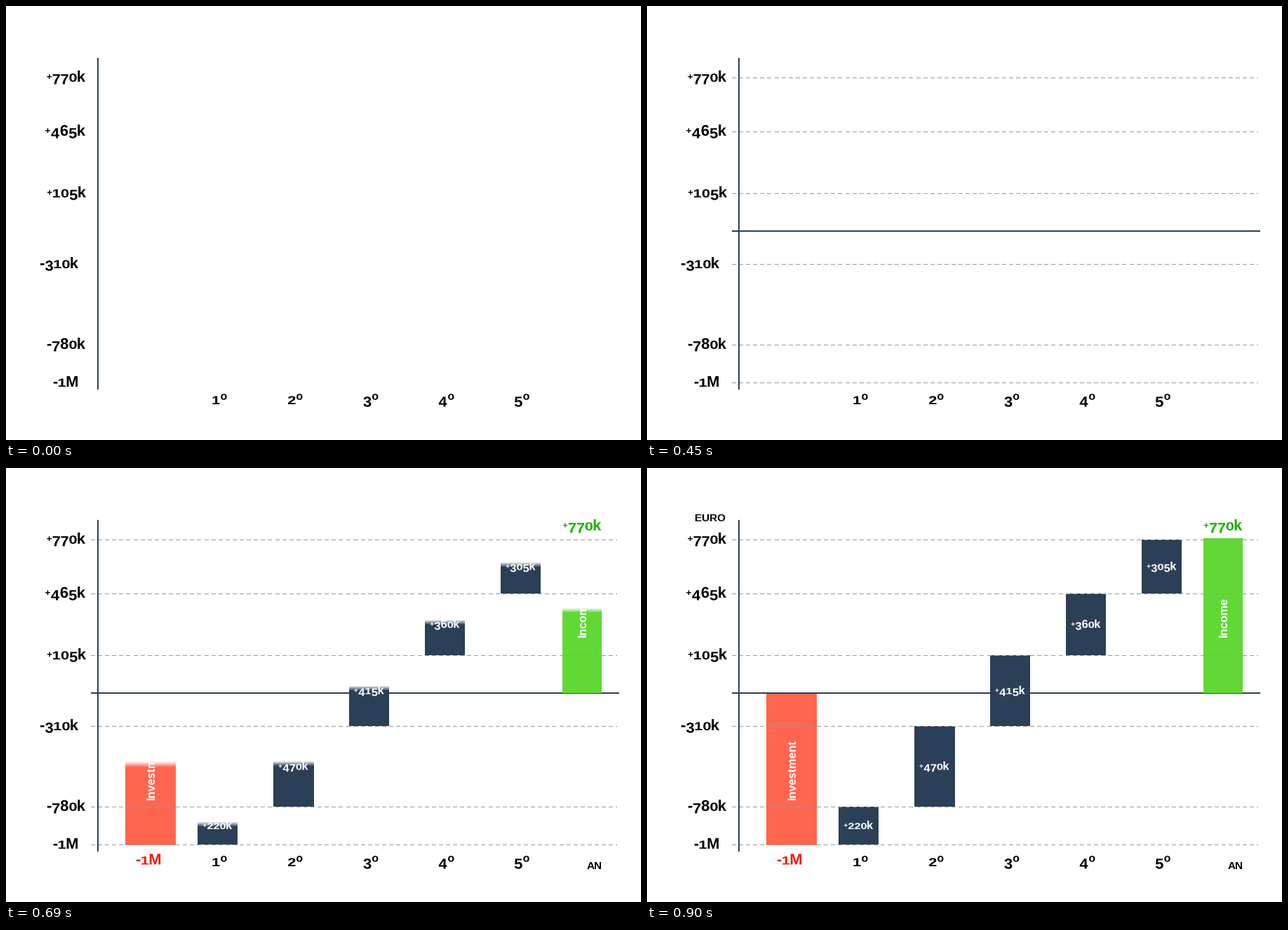
These frames come from a looping animation (905x619 px, 0.93 s). A matplotlib script:

```python
import matplotlib.pyplot as plt
import numpy as np
from itertools import accumulate
from matplotlib.animation import FuncAnimation
from matplotlib.colors import to_rgb
from matplotlib.patches import PathPatch, Rectangle
from matplotlib.path import Path
from matplotlib.textpath import TextPath

W, H, DPI = 905, 619, 100
FRAMES, STEP = 31, 30
PX = 72 / DPI

NAVY, GREY = "#2b4057", "#999999"
RED, GREEN = "#ff6650", "#62d836"
RED_TEXT, GREEN_TEXT = "#f01c0c", "#1db000"
FONT = {"family": "Liberation Sans", "weight": "bold"}

LEFT, RIGHT = 121, 873
ZERO = 321
WIPE_STEPS = 15
LINE_FADE = 100

# Yearly cash flow in thousands and the height of each running total.
FLOWS = [220, 470, 415, 360, 305]
TOTALS = list(accumulate(FLOWS, initial=-1000))
LEVELS = [537, 483, 368, 267, 179, 102]
LABEL_RIGHT = [102, 113, 103, 114, 113, 113]

fig = plt.figure(figsize=(W / DPI, H / DPI), dpi=DPI, facecolor="white")
ax = fig.add_axes([0, 0, 1, 1])
ax.axis("off")


def old_style(ch):
    """Width scale, height scale and rise (em) for old-style figures."""
    if ch in "012":
        return 1, .76, 0
    if ch in "34579":
        return 1, .94, -.16
    if ch == "+":
        return .6, .6, .13
    if ch == "º":
        return .72, .72, .29
    return 1, 1, 0


def figure_text(x, base, s, size=22, color="black", align=.5):
    """Draw a label with old-style figures on one baseline."""
    verts, codes, pen = [], [], 0
    for ch in s:
        sx, sy, rise = old_style(ch)
        glyph = TextPath((0, 0), "o" if ch == "º" else ch, size=size, prop=FONT)
        box = glyph.get_extents()
        verts.append(np.column_stack([
            (glyph.vertices[:, 0] - box.x0) * sx + pen,
            base - glyph.vertices[:, 1] * sy - rise * size]))
        codes.append(glyph.codes)
        pen += box.width * sx + .07 * size
    verts = np.concatenate(verts)
    verts[:, 0] += x - align * (pen - .07 * size)
    return ax.add_patch(PathPatch(Path(verts, np.concatenate(codes)),
                                  fc=color, lw=0, zorder=5))


def word(x, base, s, size, color="black", rotation=0):
    return ax.text(x, base, s, fontsize=size * PX, color=color, **FONT,
                   rotation=rotation, rotation_mode="anchor",
                   ha="left", va="baseline", zorder=5)


def amount(v):
    return f"{v // 1000}M" if v % 1000 == 0 else f"{v:+d}k"


def strip(x0, x1, top, bottom, shape, color, zorder):
    """A flat coloured image whose alpha can be wiped."""
    rgba = np.zeros(shape + (4,))
    rgba[..., :3] = to_rgb(color)
    im = ax.imshow(rgba, extent=(x0, x1, bottom, top), aspect="auto",
                   interpolation="nearest", zorder=zorder)
    return im, rgba


def wipe(dist, length, fade, progress):
    """Alpha at each distance along a soft-edged wipe."""
    edge = progress * (length + fade)
    return np.clip((edge - dist) / fade, 0, 1)


class Rule:
    def __init__(self, top, thick, color, dashed, zorder):
        self.n = RIGHT - LEFT
        self.dist = np.arange(self.n) + .5
        self.mask = np.ones(self.n)
        if dashed:
            self.mask = ((self.dist % 10.1 < 6) & (self.dist < 749)).astype(float)
        self.im, self.rgba = strip(LEFT, RIGHT, top, top + thick,
                                   (1, self.n), color, zorder)

    def draw(self, i):
        p = min(i / WIPE_STEPS, 1)
        self.rgba[0, :, 3] = self.mask * wipe(self.dist, self.n, LINE_FADE, p)
        self.im.set_data(self.rgba)


class Bar:
    def __init__(self, x0, width, top, bottom, color, start):
        self.h, self.start = bottom - top, start
        self.fade = width / 8
        self.dist = self.h - np.arange(self.h) - .5
        self.im, self.rgba = strip(x0, x0 + width, top, bottom,
                                   (self.h, 1), color, 2)

    def draw(self, i):
        p = (i - WIPE_STEPS) / (FRAMES - 1 - WIPE_STEPS)
        self.rgba[:, 0, 3] = wipe(self.dist, self.h, self.fade, p)
        self.im.set_data(self.rgba)
        self.im.set_visible(i >= self.start)


ax.add_patch(Rectangle((130, 74), 1.7, 473, color=NAVY, lw=0, zorder=4))
rules = [Rule(ZERO - 1, 2, NAVY, False, 1)]
for total, y, right in zip(TOTALS, LEVELS, LABEL_RIGHT):
    rules.append(Rule(y, 1, GREY, True, 3))
    figure_text(right, y + 6, amount(total), align=1)

bars = [Bar(170, 71, ZERO + 1, LEVELS[0] + 1, RED, 16),
        Bar(793, 56, LEVELS[-1] - 2, ZERO, GREEN, 23)]

# Labels that pop in, each with its first step.
popups = [
    (figure_text(203, 565.5, amount(TOTALS[0]), color=RED_TEXT), 17),
    (word(212, 473, "Investment", 16.2, "white", 90), 17),
    (word(827, 241, "Income", 16.2, "white", 90), 23),
    (figure_text(821, 89, amount(TOTALS[-1]), color=GREEN_TEXT), 23),
    (word(827.5, 572, "AN", 15.2), 23),
    (word(68, 75.5, "EURO", 15.2), 25),
]

for n, (flow, low, high) in enumerate(zip(FLOWS, LEVELS, LEVELS[1:])):
    x = 273 + 108 * n
    figure_text(304.5 + 107.7 * n, 568, f"{n + 1}º")
    bars.append(Bar(x, 57, high, low, NAVY, 18 + n))
    label = figure_text(x + 28.5, (low + high) / 2 + 5, amount(flow), 16.5, "white")
    popups.append((label, 17 + n))

ax.set_xlim(0, W)
ax.set_ylim(H, 0)


def update(i):
    for part in rules + bars:
        part.draw(i)
    for label, start in popups:
        label.set_visible(i >= start)
    return []


anim = FuncAnimation(fig, update, frames=FRAMES, interval=STEP,
                     init_func=lambda: update(0), repeat=True, repeat_delay=0)
plt.show()
```
